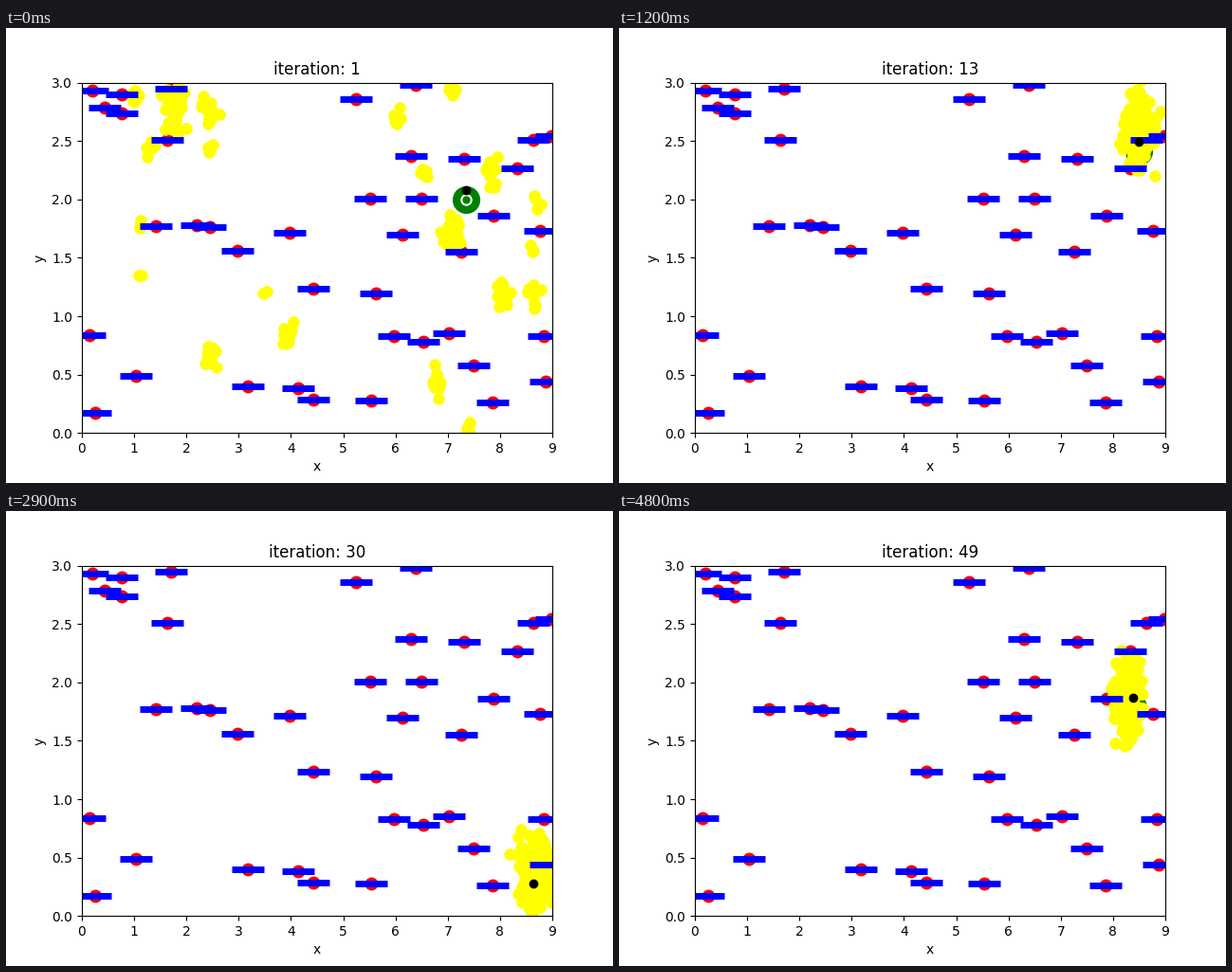
A matplotlib script that plays this animation: 640x480 px, repeating every 4.9 s.

```python
import numpy as np
import matplotlib.pyplot as plt
from matplotlib.animation import FuncAnimation

STEPS, WIDTH, HEIGHT = 49, 9, 3
PARTICLES = 150
SIGMA = (.15, .17)

LANDMARKS = np.array([
    (.20, 2.93), (.44, 2.785), (.77, 2.90), (.77, 2.74), (1.70, 2.945),
    (1.64, 2.51), (1.42, 1.77), (2.20, 1.78), (2.45, 1.765), (2.98, 1.56),
    (3.97, 1.715), (4.43, 1.235), (.15, .84), (1.04, .49), (.26, .17),
    (3.18, .40), (4.13, .38), (4.43, .285), (5.54, .275), (5.63, 1.195),
    (5.97, .828), (6.53, .78), (7.02, .853), (7.50, .577), (7.85, .26),
    (8.845, .828), (8.87, .437), (8.77, 1.73), (7.88, 1.86), (7.25, 1.55),
    (6.14, 1.70), (6.49, 2.005), (5.525, 2.005), (6.295, 2.37), (7.32, 2.345),
    (8.32, 2.265), (8.645, 2.51), (8.98, 2.543), (6.385, 2.98), (5.235, 2.857),
])

# first guesses: x, y, number of particles
GUESSES = [
    (1.03, 2.88, 8), (1.78, 2.83, 35), (1.30, 2.45, 6), (2.45, 2.77, 18),
    (2.45, 2.43, 5), (1.15, 1.80, 4), (1.10, 1.37, 3), (3.52, 1.19, 2),
    (3.97, .83, 16), (2.49, .66, 13), (6.05, 2.70, 8), (6.53, 2.23, 7),
    (7.08, 2.94, 6), (7.85, 2.27, 20), (7.08, 1.72, 24), (8.69, 1.97, 4),
    (8.64, 1.55, 3), (8.62, 1.18, 12), (8.05, 1.21, 13), (6.77, .41, 18),
    (7.39, .05, 5),
]

# key poses: step, robot x, robot y (before wrapping), cloud offset x, y
PATH = np.array([
    (0, 7.34, 2.00, 0, 0), (8, 8.04, .01, -.20, .33),
    (12, 8.49, -.59, 0, .2), (17, 9.02, -.25, -.15, .12),
    (20, 8.70, -1.28, 0, .1), (24, 7.90, -.10, 0, .2),
    (25, 7.86, .33, 0, .30), (28, 8.44, .10, 0, .2),
    (30, 8.82, .30, 0, .1), (34, 8.15, .67, .08, 0),
    (36, 8.44, .22, .1, .1), (42, 8.49, 1.52, .38, .26),
    (48, 8.38, 1.79, -.11, .08),
])


def pose(step):
    x, y, dx, dy = (np.interp(step, PATH[:, 0], col) for col in PATH.T[1:])
    return x, y % HEIGHT, dx, dy


def cloud(step):
    """Particles gather in clusters first, then in one cloud by the robot."""
    rng = np.random.default_rng(20 + step)
    x, y, dx, dy = pose(step)
    groups = []
    if step:
        groups.append(rng.normal((x + dx, y + dy), SIGMA, (PARTICLES, 2)))
    if step < 3:
        # wrong guesses move along with the robot and die out
        shift = np.array([x, y]) - PATH[0, 1:3]
        for gx, gy, n in GUESSES[::3 * step or 1]:
            center = gx + shift[0], (gy + shift[1]) % HEIGHT
            sigma = np.array([.017, .015]) * n ** 0.5
            groups.append(rng.normal(center, sigma, (n, 2)))
    return np.vstack(groups)


fig, ax = plt.subplots(figsize=(6.4, 4.8), dpi=100)
ax.set(xlim=(0, WIDTH), ylim=(0, HEIGHT), xlabel="x", ylabel="y",
       xticks=range(WIDTH + 1), yticks=np.arange(0, HEIGHT + .1, .5))
title = ax.set_title("iteration: 1")


def dots(color, size, order, xy=((), ()), **style):
    style = {"marker": "o", **style}
    return ax.plot(*xy, ls="", color=color, ms=size, zorder=order, **style)[0]


dots("red", 9, 2, LANDMARKS.T)
robot = dots("green", 20, 2.1)
ring = dots("white", 7.5, 2.2, mfc="none", mew=1.5)
particles = dots("yellow", 8, 2.3)
dots("blue", 25, 2.4, LANDMARKS.T, marker="_", mew=5)
estimate = dots("black", 6, 2.45)


def update(step):
    x, y, _, _ = pose(step)
    robot.set_data([x], [y])
    ring.set_data([x], [y])
    estimate.set_data([x + .01], [y + .08])
    particles.set_data(*cloud(step).T)
    title.set_text(f"iteration: {step + 1}")
    return robot, ring, particles, estimate, title


anim = FuncAnimation(fig, update, frames=STEPS, interval=100,
                     repeat=True, repeat_delay=0)
plt.show()
```
